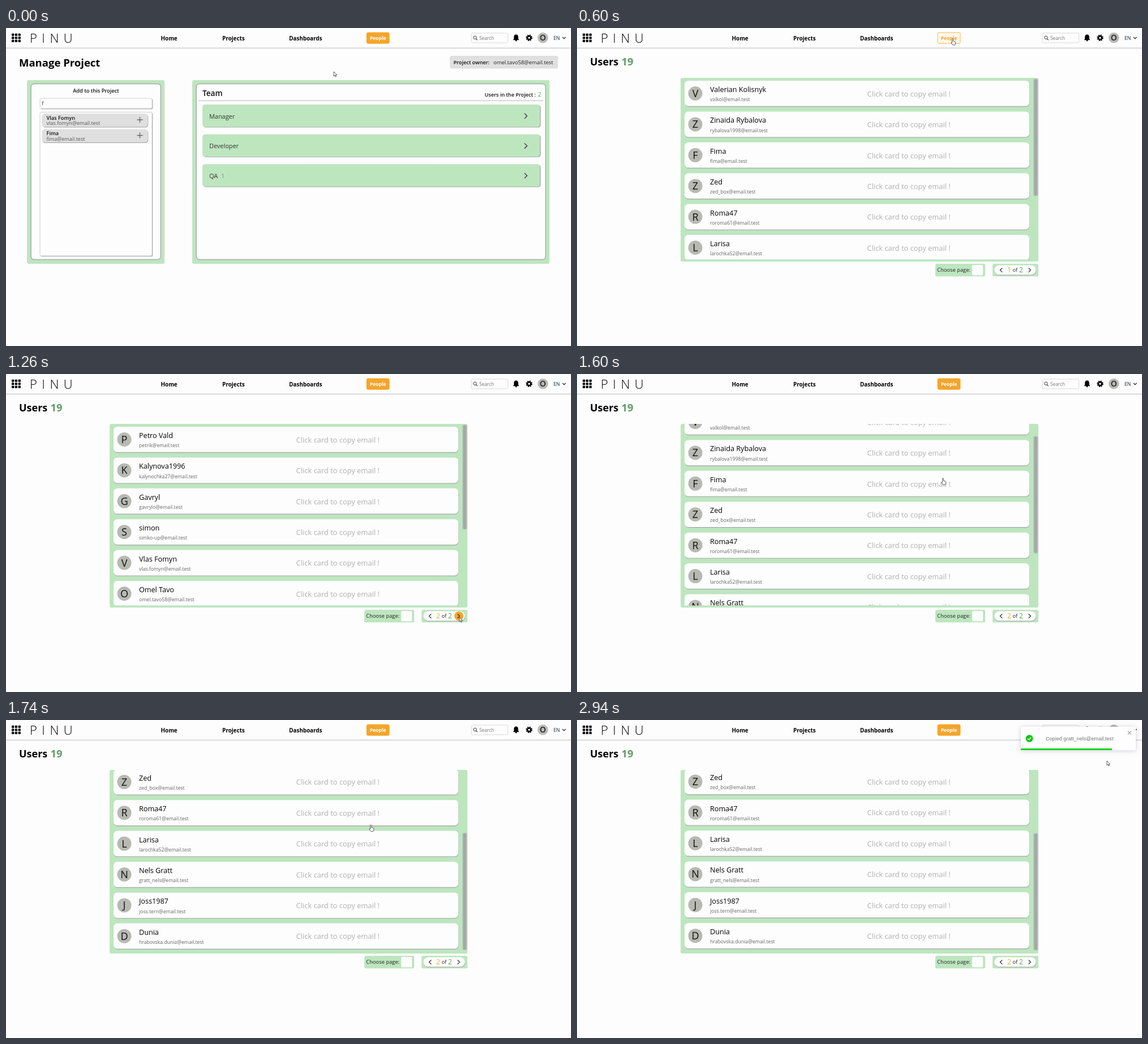
Write an HTML page that moves like this. It is 998x561 px and loops after 2.96 s.

```html
<!DOCTYPE html>
<html lang="en">
<head>
<meta charset="utf-8">
<title>Project users</title>
<style>
html, body { margin: 0; width: 100%; height: 100%; overflow: hidden; background: #fdfdfd; }
svg { display: block; width: 998px; height: 561px; font-family: "Open Sans", "Noto Sans", sans-serif; }
#toast { font-family: "Liberation Sans", Arial, sans-serif; }
#toastBox { filter: drop-shadow(0 1px 4px rgba(70, 70, 120, .25)); }
</style>
</head>
<body>
<svg id="stage" viewBox="0 0 998 561"></svg>
<script>
const LOOP = 2960, STEP = 20;
const GREEN = '#bde6bf', PAPER = '#fdfdfd', ORANGE = '#f5a52a', DIGIT = '#639c69';
const DOMAIN = '@email.test';
const PITCH = 54.4, MAX_SCROLL = 170;

// Drawing helpers
const rect = (x, y, w, h, fill, r = 0, more = '') =>
  `<rect x="${x}" y="${y}" width="${w}" height="${h}" rx="${r}" fill="${fill}" ${more}/>`;
const text = (x, y, size, str, fill = '#000', weight = 400, more = '') =>
  `<text x="${x}" y="${y}" font-size="${size}" fill="${fill}" font-weight="${weight}" ${more}>${str}</text>`;
const mid = 'text-anchor="middle"';
const circle = (x, y, r, fill, more = '') => `<circle cx="${x}" cy="${y}" r="${r}" fill="${fill}" ${more}/>`;
const line = (d, color = '#333', width = 1.1, more = '') =>
  `<path d="${d}" fill="none" stroke="${color}" stroke-width="${width}" ${more}/>`;
const raised = (x, y, w, h, fill, r, dx = 1.3, dy = 1.3) =>
  rect(x + dx, y + dy, w, h, '#adb0ad', r) + rect(x, y, w, h, fill, r);
const field = (x, y, w, h) =>
  raised(x, y, w, h, PAPER, 2.5) + rect(x, y, w, h, 'none', 2.5, 'stroke="#c4c4c4" stroke-width=".8"');
const group = (id, body, more = '') => `<g id="${id}" ${more}>${body}</g>`;

function header() {
  let s = '';
  for (let i = 0; i < 9; i++) s += rect(10 + i % 3 * 5.8, 9.8 + (i / 3 | 0) * 5.5, 4.3, 4.2, '#000', .8);
  s += text(42, 26, 22, 'PINU', '#000', 300, 'letter-spacing="8.5"');
  s += text(273.5, 21.7, 9.9, 'Home', '#000', 700) + text(382, 21.7, 9.9, 'Projects', '#000', 700)
    + text(500, 21.7, 9.9, 'Dashboards', '#000', 700);
  s += rect(637, 8, 40, 19.3, ORANGE, 2.5, `id="peopleBox" stroke="${ORANGE}" stroke-width=".8"`)
    + text(657, 20.8, 8.5, 'People', '#fff', 700, `id="people" ${mid}`);
  s += rect(822, 9, 64.5, 17, PAPER, 2, 'stroke="#d6d6d6" stroke-width=".9"')
    + circle(828.3, 16.8, 2.7, 'none', 'stroke="#333" stroke-width="1"') + line('M830.3 18.8l2.4 2.5')
    + text(836, 20.6, 8.3, 'Search', '#777');
  s += '<path d="M901 11.5c-3 0-3.8 2.3-3.8 5v2.5l-1.2 1.5v.7h10v-.7l-1.2-1.5v-2.5c0-2.7-.8-5-3.8-5z"/>'
    + circle(901, 22, 1.4, '#000');
  s += circle(924, 17.3, 3.1, 'none', 'stroke="#000" stroke-width="2.6"')
    + circle(924, 17.3, 4.9, 'none', 'stroke="#000" stroke-width="1.8" stroke-dasharray="2.1 1.75"');
  s += circle(948.3, 17.3, 9.2, '#b9b9b7') + text(948.3, 22.4, 14, 'O', '#222', 600, mid);
  s += text(967, 20.5, 8.7, 'EN', '#1c2b3a') + line('M983 16l2.8 2.8 2.8-2.8', '#222', 1.2);
  return s + rect(0, 34.8, 998, 1.2, '#c3c5c9');
}

function panel(x, w) {
  return rect(x, 92, w, 324, GREEN, 3)
    + rect(x + 7.2, 98.5, w - 14, 310, PAPER, 5.5, 'stroke="#a8aaa8" stroke-width="1.4"');
}

function managePage() {
  let s = text(23, 68, 18.5, 'Manage Project', '#000', 700);
  s += rect(784, 49, 191, 22.5, '#e0e0e0', 3) + text(790.5, 63.7, 9.1, 'Project owner:', '#111', 600)
    + text(861, 63.7, 9.4, 'omel.tavo58' + DOMAIN, '#222');
  s += panel(37, 243) + text(159, 114.3, 9.2, 'Add to this Project', '#111', 600, mid);
  s += field(60, 124, 198, 18) + text(63.5, 136, 8.6, 'f', '#222') + field(60, 148.5, 198, 253.5);
  [['Vlas Fomyn', 'vlas.fomyn'], ['Fima', 'fima']].forEach(([name, mail], i) => {
    const y = 151 + i * 27.5;
    s += raised(63.5, y, 187, 23.3, '#dfdfdf', 5.5, .8) + text(71.5, y + 10.5, 9.2, name, '#111', 600)
      + text(71.5, y + 20.2, 9, mail + DOMAIN, '#555')
      + line(`M231.5 ${y + 11}h10m-5-5v10`, '#666', 1.3);
  });
  s += panel(329, 631) + text(347, 119.5, 13.6, 'Team', '#111', 600)
    + text(845.5, 121, 9.1, 'Users in the Project :', '#111', 600) + text(939.5, 121, 10.2, '2', DIGIT)
    + rect(340, 127.6, 609, 1, '#b5b5b5');
  ['Manager', 'Developer', 'QA'].forEach((role, i) => {
    const y = 135 + i * 52.6;
    s += raised(347, y, 596, 39.5, GREEN, 4.5, 1.5, 1) + text(359, y + 24.7, 10.9, role, '#333', 500)
      + line(`M915.8 ${y + 15.7}l4.6 4.6-4.6 4.6`, '#222', 1.2);
  });
  return s + text(380, 265, 10.5, '1', '#888');
}

const firstPage = [['Petro Vald', 'petrik'], ['Kalynova1996', 'kalynochka27'], ['Gavryl', 'gavrylo'],
  ['simon', 'simko-up'], ['Vlas Fomyn', 'vlas.fomyn'], ['Omel Tavo', 'omel.tavo58']];
const secondPage = [['Valerian Kolisnyk', 'valkol'], ['Zinaida Rybalova', 'rybalova1998'], ['Fima', 'fima'],
  ['Zed', 'zed_box'], ['Roma47', 'roroma61'], ['Larisa', 'larochka52'], ['Nels Gratt', 'gratt_nels'],
  ['Joss1987', 'joss.tern'], ['Dunia', 'hrabovska.dunia']];

const userCards = users => users.map(([name, mail], i) => {
  const y = 93 + i * PITCH;
  return raised(190, y, 609, 44.8, PAPER, 6.5, .4, 1.4)
    + circle(209, y + 22.5, 12.5, '#b9b9b3') + text(209, y + 29, 18, name[0].toUpperCase(), '#111', 500, mid)
    + text(235, y + 20, 12.6, name, '#000', 500) + text(235, y + 36.2, 8.7, mail + DOMAIN, '#666')
    + text(512.5, y + 27.7, 12.9, 'Click card to copy email !', '#b0b0b0', 500);
}).join('');

function usersPage() {
  let s = text(23, 66, 18, 'Users', '#000', 700) + text(78.5, 66, 18.4, '19', DIGIT, 700);
  s += rect(183, 88, 632, 324, GREEN, 3) + '<clipPath id="view"><rect x="183" y="88" width="632" height="320.5"/></clipPath>';
  s += `<g clip-path="url(#view)">${group('first', userCards(firstPage))}${group('second', userCards(secondPage))}</g>`;
  s += group('thumb', rect(806, 89.5, 8.6, 207, '#b4c6b6', 3) + rect(807.6, 90.5, 5.2, 205, '#a6a6aa', 2));
  s += rect(633, 416, 88, 22.3, GREEN, 3) + text(636, 430.3, 9.4, 'Choose page:', '#222')
    + rect(698, 418, 19, 18.3, PAPER, 2);
  s += rect(734, 416, 81, 22.3, GREEN, 3) + raised(737.5, 418.5, 73, 16.8, PAPER, 8.2, .4)
    + circle(800, 427, 8, ORANGE, 'id="next"')
    + line('M751.2 423.3l-3.8 3.8 3.8 3.8M797.6 423.3l3.8 3.8-3.8 3.8', '#222', 1.2)
    + text(760, 431.2, 11.8, '1', ORANGE, 500, 'id="pageNo"') + text(769.5, 430.4, 9.2, 'of', '#222')
    + text(781, 431.2, 11.8, '2', DIGIT, 500);
  return s;
}

const toast = () => rect(784, 12, 203, 41.3, '#fefefe', 2, 'id="toastBox"')
  + circle(799, 32.6, 6.4, '#10c415') + line('M796 32.8l2.2 2.2 4-4.4', '#fff', 1.4)
  + text(828, 35.6, 9.1, 'Copied gratt_nels' + DOMAIN, '#757575')
  + line('M973 19.5l6 6m0-6l-6 6', '#a5a5a5', 1.2)
  + rect(784, 50.2, 203, 2.9, '#0bd512', 0, 'id="progress"');

const cursor = 'fill="#fff" stroke="#333" stroke-width=".8" stroke-linejoin="round"';
const stage = document.getElementById('stage');
stage.innerHTML = rect(0, 0, 998, 561, PAPER) + header()
  + group('manage', managePage()) + group('users', usersPage()) + group('toast', toast())
  + `<path id="arrow" ${cursor} d="M0 0V8l1.9-1.6 1.2 2.7 1.2-.5-1.2-2.7h2.4z"/>`
  + `<path id="hand" ${cursor} d="M-1 1q0-1 1-1t1 1v3.5l3 .8q1.6.5 1.3 2.2l-.6 3q-.2 1-1 1h-3q-.8 0-1.3-.8l-2.2-3.4q.5-1 1.8 0z"/>`;

const el = id => document.getElementById(id);
const show = (id, on) => el(id).setAttribute('display', on ? 'inline' : 'none');
const move = (id, x, y) => el(id).setAttribute('transform', `translate(${x} ${y})`);
const smooth = u => u * u * (3 - 2 * u);
const easeOut = u => 1 - (1 - u) ** 3;

// Interpolates rows of [time, ...values]
function track(rows, t, ease) {
  const i = rows.findIndex(row => row[0] > t);
  if (i === 0) return rows[0].slice(1);
  if (i < 0) return rows[rows.length - 1].slice(1);
  const a = rows[i - 1], b = rows[i], u = ease((t - a[0]) / (b[0] - a[0]));
  return a.slice(1).map((v, k) => v + (b[k + 1] - v) * u);
}

const OPEN = 560, LOADED = 680, NEXT = 1240, SWAP = 1300, TOAST = 2600;
const pointerPath = [[40, 579, 77], [480, 663.5, 18.5], [680, 663.5, 18.5], [1180, 801, 429], [1300, 801, 429],
  [1540, 647, 183.5], [1740, 644.5, 185], [1840, 644.5, 185], [2260, 468, 275], [2480, 468, 275], [2900, 936, 72]];
const scrollPath = [[1545, 0], [1747, MAX_SCROLL]];
const toastPath = [[TOAST, 1560], [TOAST + 138, -13], [TOAST + 172, 5], [TOAST + 207, -2.6], [TOAST + 230, 0]];

function draw(t) {
  const [x, y] = track(pointerPath, t, smooth);
  const [scroll] = track(scrollPath, t, smooth);
  const opened = t >= OPEN, first = t >= LOADED && t < SWAP;
  const inside = (l, top, r, b) => x >= l && x <= r && y >= top && y <= b;

  const onPeople = inside(637, 8, 677, 27.5);
  el('peopleBox').setAttribute('fill', onPeople ? '#fdf7ea' : ORANGE);
  el('people').setAttribute('fill', onPeople ? ORANGE : '#fff');

  show('manage', !opened);
  show('users', opened);
  show('first', first);
  show('second', !first);
  move('second', 0, -scroll);
  move('thumb', 0, scroll * 110 / MAX_SCROLL);
  for (const [i, bar] of [...el('thumb').children].entries())
    bar.setAttribute('height', (first ? 185 : 207) - i * 2);
  el('pageNo').textContent = t < NEXT ? 1 : 2;
  show('next', Math.hypot(x - 800, y - 427) < 8.5);

  show('toast', t >= TOAST);
  move('toast', track(toastPath, t, easeOut)[0], 0);
  el('progress').setAttribute('width', 203 * Math.min(1, 1 - (t - TOAST) / 1640));

  const onCard = opened && inside(190, 88, 799, 408);
  show('hand', onPeople || onCard);
  show('arrow', !(onPeople || onCard));
  move('hand', x, y);
  move('arrow', x, y);
}

function tick() {
  draw(Math.floor(performance.now() % LOOP / STEP) * STEP);
  requestAnimationFrame(tick);
}
tick();
</script>
</body>
</html>
```
